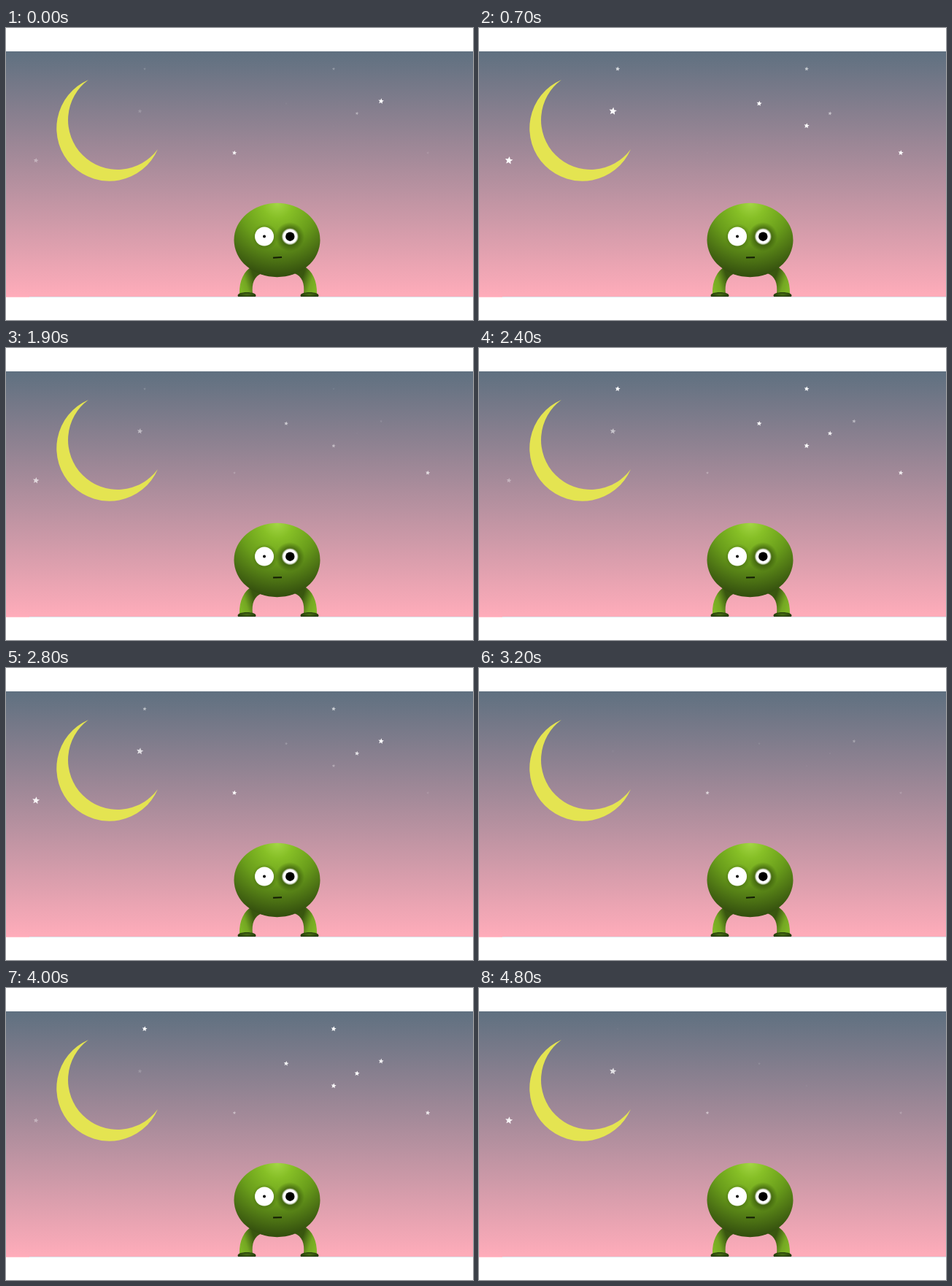
An HTML page that plays this animation: 640x400 px, repeating every 4.9 s.

```html
<!DOCTYPE html>
<html>
<head>
<meta charset="utf-8">
<title>Night creature</title>
<style>
  html, body { margin: 0; width: 100%; height: 100%; overflow: hidden; background: #fff; }
  svg { display: block; width: 640px; height: 400px; }
</style>
</head>
<body>
<svg viewBox="0 0 640 400">
  <defs>
    <linearGradient id="sky" x2="0" y2="1">
      <stop stop-color="#5f7080"/><stop offset="1" stop-color="#ffacba"/>
    </linearGradient>
    <radialGradient id="skin" gradientUnits="userSpaceOnUse" cx="372" cy="240" r="104">
      <stop stop-color="#a2d644"/><stop offset=".2" stop-color="#86bf26"/>
      <stop offset=".5" stop-color="#6a9e1b"/><stop offset="1" stop-color="#2f480d"/>
    </radialGradient>
    <linearGradient id="limb" gradientUnits="userSpaceOnUse" x1="320" x2="341" y1="352" y2="345">
      <stop stop-color="#7fb526"/><stop offset=".4" stop-color="#74a722"/><stop offset="1" stop-color="#39560f"/>
    </linearGradient>
    <radialGradient id="foot">
      <stop stop-color="#4a7016"/><stop offset="1" stop-color="#263d0a"/>
    </radialGradient>
    <radialGradient id="shade">
      <stop offset=".5" stop-color="#2f4c08" stop-opacity=".75"/>
      <stop offset="1" stop-color="#2f4c08" stop-opacity="0"/>
    </radialGradient>
    <radialGradient id="softEye">
      <stop offset=".8" stop-color="#fff"/><stop offset="1" stop-color="#fff" stop-opacity=".2"/>
    </radialGradient>
    <g id="leg">
      <path d="M338 326C326 333 319.5 346 320 364H338C336.5 350 340 340 351 336Z" fill="url(#limb)"/>
      <path d="M318 368C313 360 347 360 342 368Z" fill="url(#foot)"/>
    </g>
  </defs>

  <rect y="32" width="640" height="336" fill="url(#sky)"/>
  <rect x="32" y="368" width="608" height="1" fill="#dbe2ea"/>
  <rect y="368" width="32" height="1" fill="#ffc4ce"/>
  <g id="stars" fill="#fff"></g>
  <path d="M113 71A72.3 72.3 0 1 0 208 166A68 68 0 1 1 113 71Z" fill="#e4e451"/>

  <use href="#leg"/>
  <use href="#leg" transform="matrix(-1 0 0 1 746 0)"/>
  <ellipse cx="371.5" cy="290.5" rx="59" ry="50.7" fill="url(#skin)"/>
  <circle cx="355" cy="286" r="18" fill="url(#shade)" opacity=".6"/>
  <circle cx="389" cy="286" r="20" fill="url(#shade)"/>
  <circle cx="354" cy="285.5" r="13" fill="#fff"/>
  <circle cx="354" cy="285.5" r="2"/>
  <circle cx="389.3" cy="285.7" r="11.5" fill="url(#softEye)"/>
  <circle cx="389.3" cy="285.7" r="6.2"/>
  <path id="mouth" fill="none" stroke="#111a04" stroke-width="2"/>
</svg>
<script>
const LOOP = 4900, STEP = 100, STAGGER = 60;

// Stars in a group twinkle at one period, each a little after the one before.
const groups = [
  { period: 1500, peak: 950, size: 3.7, at: [[190, 56], [449, 56], [481, 117]] },
  { period: 1580, peak: 610, size: 3.8, at: [[578, 171], [384, 103.5], [449, 134]] },
  { period: 1000, peak: 640, size: 5.6, at: [[183.5, 114], [41, 181.5]] },
  { period: 1400, peak: -40, size: 4, at: [[514, 100.3]] },
  { period: 1520, peak: -150, size: 3.5, at: [[313, 171]] }
];

const starPath = 'M' + Array.from({ length: 10 }, (_, i) => {
  const r = i % 2 ? .45 : 1, a = i * Math.PI / 5;
  return `${r * Math.sin(a)} ${-r * Math.cos(a)}`;
}).join('L') + 'Z';

const pulse = (t, peak, period) => Math.cos(Math.PI * (t - peak) / period) ** 2;

const sky = document.getElementById('stars');
const mouth = document.getElementById('mouth');

function makeStar() {
  const shape = document.createElementNS('http://www.w3.org/2000/svg', 'path');
  shape.setAttribute('d', starPath);
  return sky.appendChild(shape);
}

const stars = groups.flatMap(({ period, peak, size, at }) =>
  at.map(([x, y], i) => ({ x, y, size, period, peak: peak + i * STAGGER, shape: makeStar() })));

function draw(t) {
  for (const { x, y, size, period, peak, shape } of stars) {
    const glow = pulse(t, peak, period);
    const scale = size * (.45 + .55 * glow);
    shape.setAttribute('transform', `translate(${x} ${y}) rotate(8) scale(${scale})`);
    shape.setAttribute('opacity', glow);
  }
  const lift = .3 * pulse(t, 0, 3200);
  mouth.setAttribute('d', `M366 ${314.4 + lift}L378 ${314.4 - lift}`);
}

function tick() {
  let t = Math.floor(performance.now() % LOOP / STEP) * STEP;
  if (t > 200 && t < 500) t = 200; // short rest early in the loop
  draw(t);
  requestAnimationFrame(tick);
}
tick();
</script>
</body>
</html>
```
